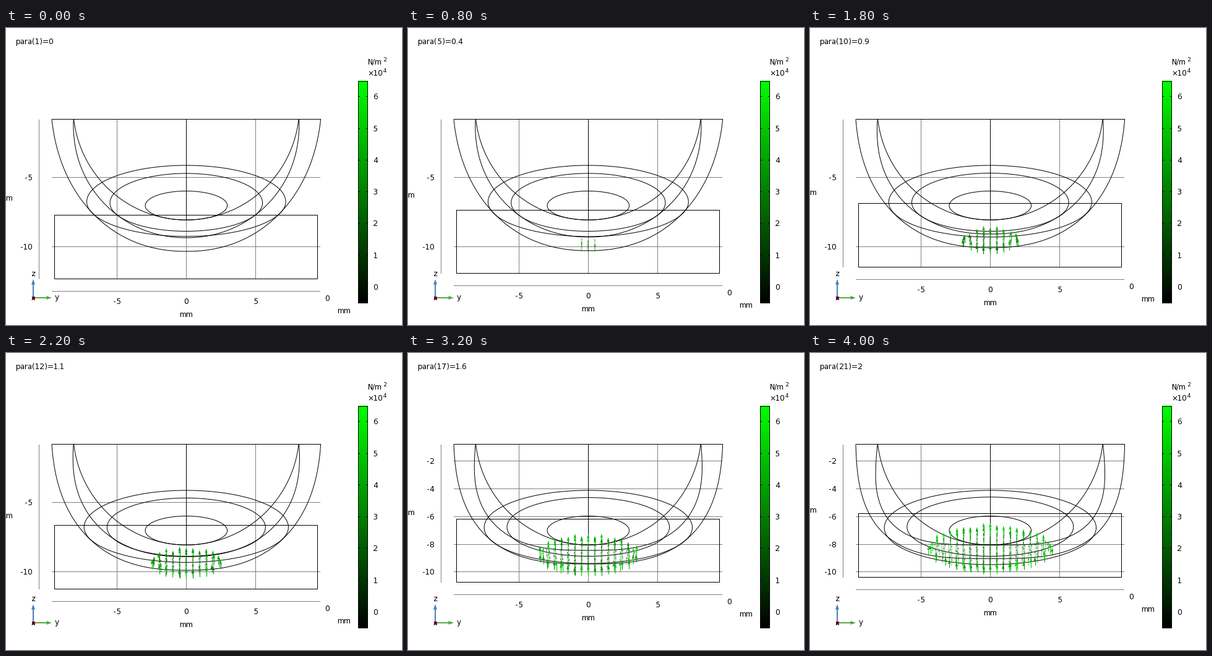
Recreate the animation shown at these times as a matplotlib script. Size 640x480 px, loop 4.2 s.

```python
import numpy as np
import matplotlib.pyplot as plt
from matplotlib.animation import FuncAnimation
from matplotlib.collections import LineCollection, PolyCollection
from matplotlib.patches import Polygon, Rectangle

W, H, DPI = 640, 480, 100
FRAMES, INTERVAL = 21, 200
PX = 72 / DPI
plt.rcParams["font.family"] = "DejaVu Sans"
plt.rcParams["text.hinting_factor"] = 1  # whole-pixel letter advances

CX, TOP, MM = 291.3, 147, 22.4
LEFT, RIGHT = 74, 508
GREY = "#808080"

fig = plt.figure(figsize=(W / DPI, H / DPI), dpi=DPI, facecolor="white")
ax = fig.add_axes([0, 0, 1, 1])
dynamic = []
noise = np.random.default_rng(4).uniform(0.75, 1.15, (25, 25))


def line(x, y, color="black", z=3, width=1.0):
    artist, = ax.plot(x, y, color=color, lw=width * PX, zorder=z,
                      solid_capstyle="butt", solid_joinstyle="miter", snap=False)
    return artist


def segment(x0, y0, x1, y1, color="black", z=3):
    """Horizontal or vertical line through whole pixels, ends included."""
    if y0 == y1:
        return line([x0, x1 + 1], [y0 + .5, y0 + .5], color, z)
    return line([x0 + .5, x0 + .5], [y0, y1 + 1], color, z)


def text(x, baseline, label, ha="center", size=12):
    return ax.text(x, baseline, label, ha=ha, va="baseline",
                   fontsize=size * PX, color="black", zorder=8)


def bowl(half, bottom, power, rise=0.0, bulge=0.0):
    """Superellipse centred `rise` above the top edge and cut off there."""
    t = np.linspace(0, np.pi, 241)
    s = np.sin(t)
    top = TOP + .5
    start = rise / (bottom - top + rise)
    d = start + (1 - start) * s
    rel = np.clip((1 - d ** power) / (1 - start ** power), 0, 1)
    x = half * rel ** (1 / power)
    x += bulge * np.sin(np.pi * s) * np.sqrt(np.abs(np.cos(t)))
    return line(CX + np.sign(np.cos(t)) * x, top + (bottom - top) * s)


def ring(half, top, bottom, mid):
    """Closed oval whose widest point sits at mid."""
    t = np.linspace(0, 2 * np.pi, 241)
    s = np.sin(t)
    y = mid + np.where(s > 0, bottom - mid, mid - top) * s
    return line(CX + half * np.cos(t), y)


def draw_static():
    segment(LEFT, TOP, RIGHT, TOP)
    segment(291, TOP, 291, 309)
    bowl(181.7, 310.2, 2, rise=20.6)
    ring(66.3, 263.5, 310.2, 287)

    # Colour bar
    ramp = np.zeros((256, 1, 3))
    ramp[:, 0, 1] = np.linspace(1, 0, 256)
    ax.imshow(ramp, extent=(569, 585, 444.5, 86), aspect="auto", zorder=2,
              interpolation="bilinear")
    ax.add_patch(Rectangle((569.5, 86.5), 15, 358, fill=False, lw=PX,
                           zorder=4, snap=False))
    for value in range(7):
        y = round(418 - 51.3 * value)
        segment(569, y, 571, y, z=5)
        segment(582, y, 584, y, z=5)
        text(596.8, y + 5, str(value))
    text(584, 59, "N/m", "left")
    text(609, 54, "2", "left", 9)
    text(584, 77, "×10", "left")
    text(609.5, 72, "4", "left", 9)

    # Orientation triad
    blue, green = "#4682be", "#50aa46"
    line([44, 44], [436, 413], blue, 6, 2)
    line([44, 67], [436, 436], green, 6, 2)
    ax.add_patch(Polygon([(44, 406), (41, 414.5), (47, 414.5)], color=blue, lw=0))
    ax.add_patch(Polygon([(74, 436), (65.5, 433), (65.5, 439)], color=green, lw=0))
    ax.add_patch(Rectangle((41.5, 433.5), 5, 5, color="#d2004b", lw=0, zorder=7))
    text(44.3, 439.5, "x", size=11)
    text(44, 401, "z")
    text(82.5, 439, "y")

    ax.set_xlim(0, W)
    ax.set_ylim(H, 0)
    ax.axis("off")


def contact_arrows(p, base_y):
    radius = 2 + 48.2 * p
    pitch, tilt = 10.75, 0.345
    shafts, heads, colors, widths = [], [], [], []
    for j in range(-9, 10):
        for i in range(-9, 10):
            rho = np.hypot(i, j) * pitch / radius
            if rho > 1:
                continue
            reach = np.sqrt(max((radius / pitch) ** 2 - i * i, 0))
            rim = reach - abs(j) < 1.7 and p > 0.8
            k = noise[j + 12, i + 12]
            spread = 1 + (0.04 * np.sin(2.2 * j) if j > -3 else 0)
            x = CX + i * pitch * spread
            y = base_y + j * pitch * tilt - 4 * p * rho ** 2
            length = 16 * min(k, 1) if rim else 13 * k
            tip = y - length
            half, head = (2.0, 7) if rim else (1.0, 2.6)
            shafts.append([(x, y), (x, tip + head)])
            heads.append([(x, tip), (x - half, tip + head), (x + half, tip + head)])
            level = (0.48 + 0.15 * p) * k if rim else 0.48 * k
            colors.append((0, min(level, 0.9), 0))
            widths.append((1.1 if rim else 0.45) * PX)
    return [
        ax.add_collection(LineCollection(shafts, colors=colors, linewidths=widths,
                                         zorder=4), autolim=False),
        ax.add_collection(PolyCollection(heads, facecolors=colors, linewidths=0,
                                         zorder=5), autolim=False),
    ]


def update(i):
    while dynamic:
        dynamic.pop().remove()
    p = i / 10
    low = round(405 - 21.6 * p)
    high = round(302.2 - 21.6 * p)
    lift = np.interp(p, [0, .4, .6, .9, 1.3, 1.6, 2],
                     [0, 1.1, 2.7, 6, 13.7, 20, 28.7])
    add = dynamic.append

    add(text(15, 26, f"para({i + 1})={p:g}", "left"))

    # Grid and axes
    add(segment(53, TOP + 1, 53, low, GREY, 1))
    add(segment(LEFT, low + 20, RIGHT - 1, low + 20, GREY, 1))
    for y_mm in (-5, 0, 5):
        x = round(291 + y_mm * MM)
        add(segment(x, TOP, x, low, GREY, 1))
        add(text(x + .3, low + 41, str(y_mm)))
    ticks = (-5, -10) if p < 1.55 else (-2, -4, -6, -8, -10)
    for z_mm in ticks:
        y = round(129.4 - z_mm * MM)
        add(segment(LEFT, y, RIGHT - 1, y, GREY, 1))
        add(text(43, y + 5, str(z_mm), "right"))
    add(text(11, (TOP + low) / 2 + 3, "mm", "right"))
    add(text(291, low + 62, "mm"))
    add(text(519, low + 36, "0"))
    add(text(546, low + 56, "mm"))

    # Block
    add(line([78.5, 503.5, 503.5, 78.5, 78.5],
             [high + .5, high + .5, low + .5, low + .5, high + .5]))

    # Deforming shell
    add(bowl(217.3, 361 - lift, 2.15 + 0.2625 * p ** 2, rise=40))
    add(bowl(182.3, 339 - lift, 2.07 + 0.2225 * p ** 2 + 0.04 * p ** 4,
             bulge=2 + 1.3 * p))
    add(ring(160.8 + 2.4 * p + 1.4 * p ** 2, 222, 336.8 + 1.3 * p ** 2,
             280.8 + 0.8 * p))
    add(ring(123.3 + 2.6 * p + 1.5 * p ** 2, 235 - 0.55 * p ** 2, 328.5,
             282.8 - 0.9 * p))

    if i:
        dynamic.extend(contact_arrows(p, 360 - lift))
    return dynamic


draw_static()
anim = FuncAnimation(fig, update, frames=FRAMES, interval=INTERVAL,
                     init_func=lambda: update(0), repeat=True, repeat_delay=0,
                     blit=False)
plt.show()
```
